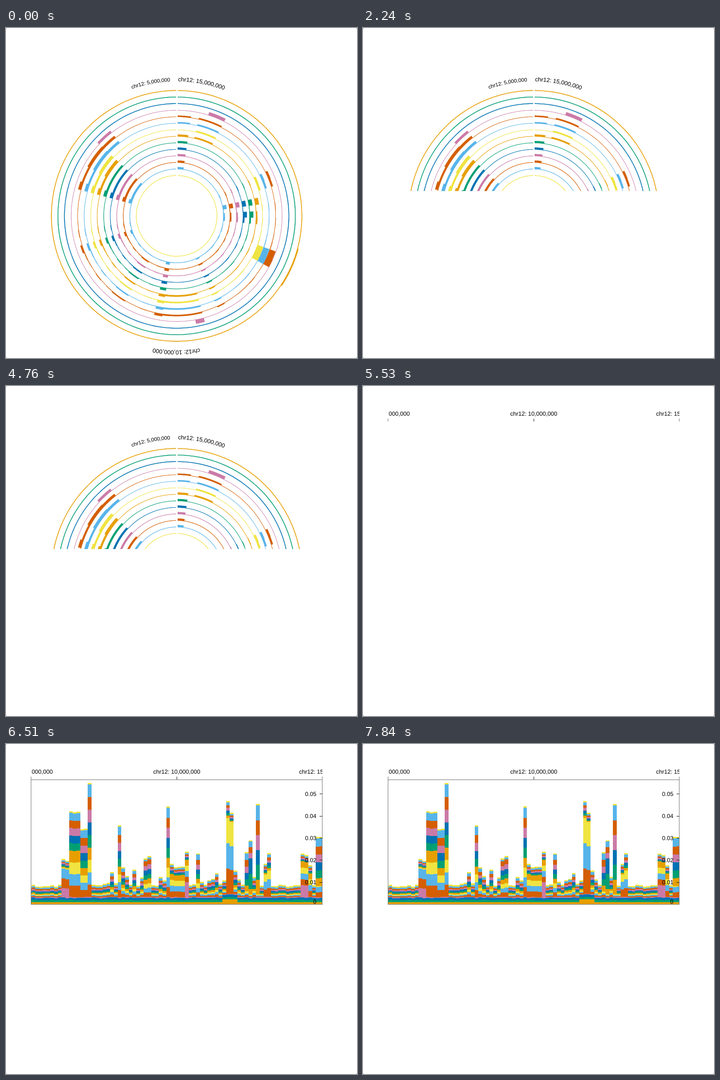
These frames come from a looping animation (722 by 678 pixels, 7910 ms). A matplotlib script:

```python
import numpy as np
import matplotlib.pyplot as plt
from matplotlib.animation import FuncAnimation
from matplotlib.patches import PathPatch, Polygon, Rectangle
from matplotlib.path import Path
from matplotlib.textpath import TextPath

W, H, DPI = 722, 678, 64
STEP, LOOP = 70, 7910
HALF_AT, AXIS_AT, BARS_AT = 2170, 4900, 5950

COLORS = ["#E79F00", "#029F73", "#0072B2", "#CB7AA7", "#D45E00", "#57B4E9", "#EFE441"]
ROWS, COLUMNS = 14, 79
LEFT, RIGHT, TOP, BOTTOM = 51, 651, 73, 329.5
CX, CY = 351, 386
OUTER, PITCH, RING_SCALE = 257, 13.42, 0.26
INK, GRAY = "#222222", "#777777"

fig = plt.figure(figsize=(W / DPI, H / DPI), dpi=DPI, facecolor="white")
ax = fig.add_axes([0, 0, 1, 1])
ax.axis("off")


def make_values():
    """Heights in pixels: a steady base, small random bumps and the main hills."""
    rng = np.random.default_rng(12)
    base = np.concatenate([np.full(3, 4.5), np.linspace(1.6, 2.9, ROWS - 3)])
    values = base[:, None] * rng.uniform(0.94, 1.06, COLUMNS)
    values[4:13, 18:65] += rng.exponential(1.4, 47)

    def hill(columns, rows, height):
        values[rows[0]:rows[-1] + 1, columns[0]:columns[-1] + 1] += height

    hill([9, 10], [3, 5], 18)
    hill([11, 16], [4, 12], 13)
    hill([11, 13], [4, 7], 9)
    hill([16], [4, 12], 10.5)
    hill([24], [4, 12], 11)
    hill([31, 32], [4, 11], 6)
    hill([37], [4, 12], 16)
    hill([38, 42], [4, 7], 9)
    hill([42], [3], 31)
    hill([52, 55], [0], 6)
    hill([53, 54], [4, 6], 47)
    hill([58, 59], [7, 12], 9)
    hill([59], [8, 9], 20)
    hill([61], [7, 12], 28)
    hill([63, 64], [4, 6], 13)
    hill([73, 74], [3], 24)
    hill([73, 75], [4, 7], 10)
    hill([77, 78], [4, 5], 9)
    hill([77, 78], [7, 12], 14)
    return values


values = make_values()
edges = np.clip(45.1 + 7.69 * np.arange(COLUMNS + 1), LEFT, RIGHT)


def put(patch, group):
    ax.add_patch(patch)
    group.append(patch)
    return patch


def box(group, x, y, w, h, color, z=3):
    return put(Rectangle((x, y), w, h, fc=color, lw=0, aa=False, zorder=z), group)


def glyphs(text, size=12):
    path = TextPath((0, 0), text, size=size, prop={"family": "Liberation Sans"})
    return path, path.get_extents().x1


def flat_text(group, text, x, y, align):
    path, width = glyphs(text)
    points = path.vertices * [1, -1] + [x - width * align, y]
    return put(PathPatch(Path(points, path.codes), fc="black", lw=0, zorder=5), group)


def arc_text(group, text, start, size=12, radius=276.5):
    """Bend text clockwise along a circle; start is in degrees from the top."""
    path, _ = glyphs(text, size)
    x, y = path.vertices.T
    angle = np.radians(start) + x / radius
    points = np.column_stack([CX + (radius + y) * np.sin(angle),
                              CY - (radius + y) * np.cos(angle)])
    put(PathPatch(Path(points, path.codes), fc="black", lw=0, zorder=3), group)


def build_rings(group, samples=12):
    spots = np.linspace(edges[:-1], edges[1:], samples, axis=1)
    angle = 2 * np.pi * (spots.ravel() - LEFT) / (RIGHT - LEFT)
    turn = np.concatenate([angle, angle[::-1]])
    for row in range(ROWS):
        inner = OUTER - PITCH * row
        outer = inner + RING_SCALE * np.repeat(values[row], samples)
        radius = np.concatenate([outer, np.full(len(angle), inner)])
        points = np.column_stack([CX - radius * np.sin(turn), CY - radius * np.cos(turn)])
        color = COLORS[row % 7]
        put(Polygon(points, fc=color, ec=color, lw=0.4, zorder=2), group)
    box(group, 350, 120, 3, 200, "white")
    arc_text(group, "chr12: 15,000,000", 0.6)
    arc_text(group, "chr12: 5,000,000", -19.4, size=10.7)
    arc_text(group, "chr12: 10,000,000", 170.1)


def build_axis(group):
    clip = Rectangle((LEFT + 1, 0), RIGHT - LEFT - 1, H, transform=ax.transData)
    for million in (5, 10, 15):
        x = LEFT + 60 * (million - 5)
        label = flat_text(group, f"chr12: {million},000,000", x, 61, 0.5)
        label.set_clip_path(clip)
        box(group, min(x, RIGHT - 1), 67, 1, 6, INK if million == 10 else GRAY)


def build_bars(group):
    floor = np.full(COLUMNS, BOTTOM)
    for row in range(ROWS):
        ceiling = np.maximum(floor - values[row], TOP)
        group += ax.bar(edges[:-1], ceiling - floor, np.diff(edges), floor, align="edge",
                        color=COLORS[row % 7], lw=0, aa=False, zorder=2)
        floor = ceiling
    for y in (TOP, 329):
        box(group, LEFT, y, RIGHT - LEFT, 1, GRAY)
    for x in (LEFT, RIGHT - 1):
        box(group, x, TOP, 1, 257, GRAY)
    flat_text(group, "0", 638, 328, 1)
    for i in range(1, 6):
        y = BOTTOM - 45.35 * i
        flat_text(group, f"{i / 100:.2f}", 638, y + 4, 1)
        box(group, 645, round(y - 0.5), 6, 1, INK)


rings, axis, bars, cover = [], [], [], []
build_rings(rings)
build_axis(axis)
build_bars(bars)
box(cover, 0, 335, W, H - 335, "white", z=8)
for x in (0, W - 1):
    for y in (0, H - 1):
        box([], x, y, 1, 1, GRAY, z=9)

ax.set_xlim(0, W)
ax.set_ylim(H, 0)


def show(group, visible):
    for artist in group:
        artist.set_visible(visible)


def update(frame):
    t = frame * STEP
    show(rings, t < AXIS_AT)
    show(cover, HALF_AT <= t < AXIS_AT)
    show(axis, t >= AXIS_AT)
    show(bars, t >= BARS_AT)
    return []


anim = FuncAnimation(fig, update, frames=LOOP // STEP, interval=STEP, repeat=True, blit=False)
plt.show()
```
